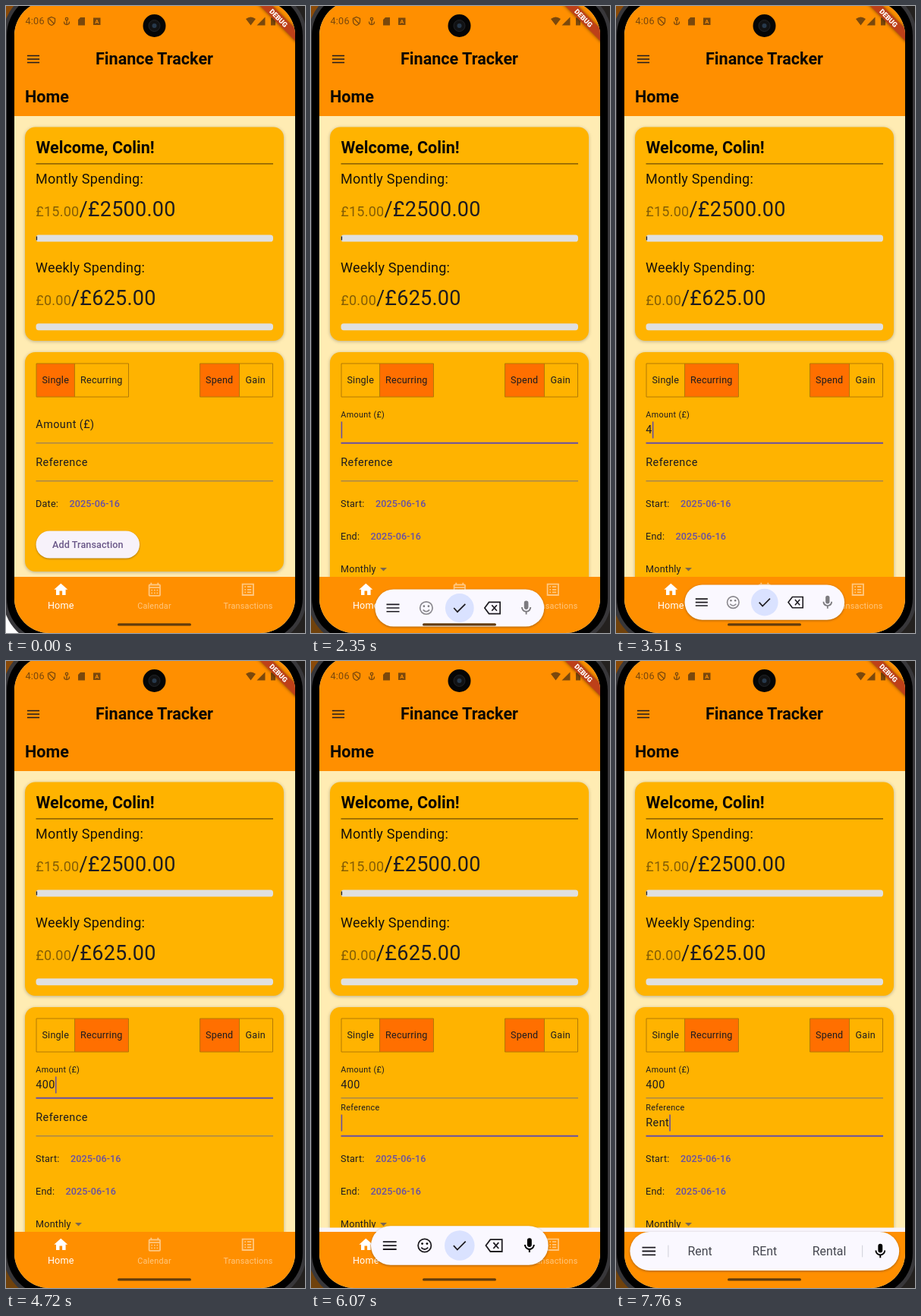
Write an HTML page that moves like this. It is 394x826 px and loops after 8 s.

```html
<!DOCTYPE html>
<html lang="en">
<head>
<meta charset="utf-8">
<title>Finance Tracker</title>
<style>
  html, body { margin: 0; width: 100%; height: 100%; overflow: hidden; background: #000; }
  svg { display: block; width: 100%; height: 100%; }
  text { font-family: Roboto, sans-serif; fill: #1d1b20; white-space: pre; }
  .title { font-size: 21.6px; font-weight: 700; fill: #0b0804; }
  .heading { font-size: 18px; letter-spacing: .225px; fill: #16110a; }
  .total { font-size: 27px; letter-spacing: .225px; }
  .spent { font-size: 18px; letter-spacing: .225px; fill: #855e05; }
  .body { font-size: 12.6px; letter-spacing: .225px; }
  .field { font-size: 14.4px; letter-spacing: .45px; }
  .action { font-size: 12.6px; font-weight: 500; letter-spacing: .09px; fill: #6750a4; }
  .tab { font-size: 10.8px; letter-spacing: .225px; fill: #fff; text-anchor: middle; }
  .hint { font-size: 16.2px; fill: #44464f; text-anchor: middle; }
  .card { fill: #ffb300; filter: drop-shadow(0 1.5px 2px #0004); }
  .outline { fill: none; stroke: #b37a05; }
  .line { stroke: #1d1b20; stroke-width: 1.8; fill: none; }
  .status { fill: #7a480c; }
</style>
</head>
<body>
<svg viewBox="0 0 394 826" preserveAspectRatio="none">
  <defs>
    <clipPath id="screenClip"><rect x="11" y="-7" width="370" height="833" rx="46"/></clipPath>
    <clipPath id="bodyClip"><rect x="11" y="145" width="370" height="607"/></clipPath>
    <path id="mic" d="M12 14a3 3 0 0 0 3-3V5a3 3 0 0 0-6 0v6a3 3 0 0 0 3 3zm5-3a5 5 0 0 1-10 0H5a7 7 0 0 0 6 6.9V21h2v-3.1A7 7 0 0 0 19 11z"/>
    <path id="menu" class="line" d="M-9-5H9M-9 0H9M-9 5H9"/>
  </defs>

  <rect width="394" height="826" fill="#24211f"/>
  <path d="M0 0H14L0 18z" fill="#8a4a08"/>
  <path id="corner" d="M0 798H22V826H0z"/>
  <rect x="-4" y="-22" width="400" height="863" rx="61" fill="#38373a"/>
  <rect x="1" y="-17" width="390" height="853" rx="56" fill="#000"/>

  <g clip-path="url(#screenClip)">
    <rect x="11" y="-7" width="370" height="833" fill="#ffecb3"/>

    <g clip-path="url(#bodyClip)">
      <rect class="card" x="25" y="159.5" width="341" height="281.5" rx="13.5"/>
      <text class="title" x="39.5" y="194">Welcome, Colin!</text>
      <path d="M39.5 207.8H352" stroke="#6b4b04" stroke-width="1.2"/>
      <text class="heading" x="39" y="234">Montly Spending:</text>
      <text class="spent" x="39.3" y="277">£15.00</text>
      <text class="total" x="96.5" y="277">/£2500.00</text>
      <rect x="39.5" y="301.5" width="312.5" height="9" rx="3.6" fill="#e0e0e0"/>
      <path d="M40.4 303.5v5" stroke="#222" stroke-width="1.4"/>
      <text class="heading" x="39" y="351">Weekly Spending:</text>
      <text class="spent" x="39.3" y="394">£0.00</text>
      <text class="total" x="86" y="394">/£625.00</text>
      <rect x="39.5" y="418.2" width="312.5" height="9" rx="3.6" fill="#e0e0e0"/>

      <rect id="formCard" class="card" x="25" y="456" width="341" height="289" rx="13.5"/>
      <rect id="singleFill" x="40" y="471" width="50.5" height="44" fill="#ff6f00"/>
      <rect id="recurFill" x="90.5" y="471" width="71" height="44" fill="#ff6f00"/>
      <path class="outline" d="M40 471H161.5V515H40zM90.5 471v44"/>
      <text class="body" x="47.4" y="497.3">Single</text>
      <text class="body" x="98" y="497.3">Recurring</text>
      <rect x="255.5" y="471" width="52" height="44" fill="#ff6f00"/>
      <path class="outline" d="M255.5 471H351.5V515H255.5zM307.5 471v44"/>
      <text class="body" x="263" y="497.3">Spend</text>
      <text class="body" x="315.5" y="497.3">Gain</text>

      <g id="amount"></g>
      <g id="reference"></g>

      <g id="singleForm">
        <text class="body" x="39" y="660">Date:</text>
        <text class="action" x="83.5" y="660">2025-06-16</text>
        <rect x="39.5" y="691.5" width="136.5" height="36" rx="18" fill="#f7f2fa" style="filter:drop-shadow(0 1px 1px #0005)"/>
        <text class="action" x="61" y="714" style="fill:#6a5788">Add Transaction</text>
      </g>
      <g id="recurForm">
        <text class="body" x="39" y="660">Start:</text>
        <text class="action" x="85" y="660">2025-06-16</text>
        <text class="body" x="39" y="703">End:</text>
        <text class="action" x="78.5" y="703">2025-06-16</text>
        <text class="body" x="39" y="746">Monthly</text>
        <path d="M91 740h9l-4.500 4.500z" fill="#7a6650"/>
      </g>
      <rect id="strip" x="11" y="746.5" width="370" height="6" fill="#f8f4fb"/>
    </g>

    <rect x="11" y="-7" width="370" height="152" fill="#ff8f00"/>
    <g transform="translate(36 70) scale(.9)"><use href="#menu"/></g>
    <text class="title" x="118" y="77">Finance Tracker</text>
    <text class="title" x="25" y="127">Home</text>

    <text class="body" x="25.5" y="24" style="fill:#7a480c">4:06</text>
    <g fill="none" stroke="#7a480c" stroke-width="1.3">
      <path d="M60 14.5l4.500 2v3.500q0 4-4.500 5.500-4.500-1.500-4.500-5.500v-3.500zM57 17l6 6"/>
      <circle cx="80" cy="17" r="1.7"/>
      <path d="M80 19v6M76.5 20.5q0 4 3.500 4t3.500-4"/>
    </g>
    <path class="status" d="M98 15h6v10.500h-9V18zM115 15.500h9.500v9.500H115zM316 17q6.500-5 13 0l-6.500 8.500zM341.500 14.500v11h-11zM349 15.500h1.500V14h3v1.500h1.500v10h-6z"/>
    <text x="119.7" y="23" text-anchor="middle" style="font-size:7.5px;font-weight:700;fill:#ff8f00">A</text>

    <rect x="11" y="752" width="370" height="74" fill="#ff8f00"/>
    <path transform="translate(61.5 758) scale(.9)" fill="#fff" d="M10 20v-6h4v6h5v-8h3L12 3 2 12h3v8z"/>
    <text class="tab" x="72.3" y="793.5" style="font-size:12.6px">Home</text>
    <g opacity=".5" fill="#fff" fill-rule="evenodd">
      <path transform="translate(185 758) scale(.9)" d="M19 4h-1V2h-2v2H8V2H6v2H5a2 2 0 0 0-2 2v14a2 2 0 0 0 2 2h14a2 2 0 0 0 2-2V6a2 2 0 0 0-2-2zm0 16H5V10h14zm0-12H5V6h14zM7 12h2v2H7zm4 0h2v2h-2zm4 0h2v2h-2zm-8 4h2v2H7zm4 0h2v2h-2zm4 0h2v2h-2z"/>
      <path transform="translate(308 758) scale(.9)" d="M3 3h18v18H3zM5 5v14h14V5zM7 7h2v2H7zm4 0h6v2h-6zm-4 4h2v2H7zm4 0h6v2h-6zm-4 4h2v2H7zm4 0h6v2h-6z"/>
      <text class="tab" x="195.5" y="793.5">Calendar</text>
      <text class="tab" x="319" y="793.5">Transactions</text>
    </g>

    <g id="toolbar">
      <rect id="pill" y="-26" height="52" rx="26" fill="#faf8ff" style="filter:drop-shadow(0 1px 1.5px #0005)"/>
      <use id="menuKey" href="#menu"/>
      <g id="keys">
        <g id="smiley" transform="translate(-46.5 0)">
          <circle class="line" r="8.7"/>
          <path class="line" d="M-4.500 2.500q4.500 5 9 0"/>
          <circle cx="-3.2" cy="-2.5" r="1.4"/><circle cx="3.2" cy="-2.5" r="1.4"/>
        </g>
        <circle r="20" fill="#dae2ff"/>
        <path class="line" d="M-8 0l5 5.500L8-5.500"/>
        <path class="line" transform="translate(46 0)" d="M-5-8H10.500V8H-5L-11 0zM-1-4l7 8M6-4l-7 8"/>
      </g>
      <g id="hints">
        <path d="M-129.500-8V8M131.500-8V8" stroke="#cfcfd8"/>
        <text class="hint" x="-87" y="6"></text>
        <text class="hint" x="0" y="6"></text>
        <text class="hint" x="87" y="6"></text>
      </g>
      <use id="micKey" href="#mic"/>
    </g>

    <rect x="147" y="813.2" width="97" height="3.4" rx="1.7" fill="#633c0c"/>
    <g transform="translate(381 -6) rotate(45)">
      <rect x="-45" y="25.2" width="90" height="11.5" fill="#bd4019" style="filter:drop-shadow(0 0 2px #0008)"/>
      <text x="0" y="34.2" text-anchor="middle" style="font-size:9.2px;font-weight:900;fill:#fff">DEBUG</text>
    </g>
    <circle cx="195.5" cy="26" r="15" fill="#050505"/>
    <circle cx="195.5" cy="26" r="7.5" fill="#111214" stroke="#222427"/>
    <circle cx="195.5" cy="26" r="3" fill="#27394c"/>
  </g>
</svg>

<script>
const LOOP = 8000, BLINK = 480;
const el = id => document.getElementById(id);
const set = (node, attrs) => { for (const k in attrs) node.setAttribute(k, attrs[k]); };
const show = (node, on) => { node.style.display = on ? '' : 'none'; };
const lerp = (a, b, p) => a + (b - a) * p;
const ramp = (t, start, length) => Math.min(1, Math.max(0, (t - start) / length));
const easeOut = p => 1 - (1 - p) ** 3;
const latest = (t, events) => events.filter(e => e[0] <= t).pop();

// Value along [time, value] points, eased out of each point.
function track(t, points) {
  let [time, value] = points[0];
  for (const [nextTime, nextValue] of points.slice(1)) {
    if (t < nextTime) return lerp(value, nextValue, easeOut(ramp(t, time, nextTime - time)));
    [time, value] = [nextTime, nextValue];
  }
  return value;
}

function makeField(id, label, baseline, focus, blur, keys) {
  const group = el(id);
  group.innerHTML = `<text class="field">${label}</text>
    <text class="field" x="39.3" y="${baseline + 7}"></text>
    <path d="M39.5 ${baseline + 19.8}H352"/>
    <rect y="${baseline - 8.5}" width="1.6" height="22" fill="#6750a4"/>`;
  const [labelText, input, rule, caret] = group.children;
  const edits = [[focus, ''], ...keys];
  return t => {
    const lift = easeOut(ramp(t, focus, 170));
    const focused = t >= focus && t < blur;
    const [editTime, value] = latest(t, edits) || [0, ''];
    set(labelText, { transform: `translate(39.3 ${lerp(baseline, baseline - 13.8, lift)}) scale(${lerp(1, .75, lift)})` });
    if (input.textContent !== value) input.textContent = value;
    const weight = ramp(t, focus, 140) - ramp(t, blur, 140);
    set(rule, { stroke: weight > .4 ? '#6750a4' : '#7d7174', 'stroke-width': lerp(1, 1.9, weight) });
    const width = value ? input.getComputedTextLength() : .3;
    set(caret, { x: 39.3 + width });
    show(caret, focused && Math.floor((t - editTime) / BLINK) % 2 === 0);
  };
}

const drawAmount = makeField('amount', 'Amount (£)', 556, 2210, 5050,
  [[3370, '4'], [3570, '40'], [3760, '400']]);
const drawReference = makeField('reference', 'Reference', 606, 5720, LOOP,
  [[6610, 'R'], [7220, 'Re'], [7690, 'Ren'], [7760, 'Rent']]);
const hintSets = [
  [6610, ['R', 'Re', 'Right']], [7220, ['Re', 'Red', 'Rest']],
  [7690, ['Ren', 'Rent', 'Rental']], [7760, ['Rent', 'REnt', 'Rental']]
];
const hintTexts = [...el('hints').querySelectorAll('text')];

function drawToolbar(t) {
  const first = t < 5000;
  show(el('toolbar'), (t >= 2240 && t < 3780) || t >= 5750);
  const y = first
    ? track(t, [[2240, 850], [2560, 771], [2840, 777], [3370, 777], [3510, 785.5], [3780, 794]])
    : track(t, [[5750, 850], [6070, 770], [6410, 777.5]]);
  const scale = first
    ? track(t, [[2240, .8], [2560, 1], [2840, .98], [3370, .98], [3510, .894], [3780, .75]])
    : track(t, [[5750, .8], [6070, .99], [6410, .98]]);
  const wide = easeOut(ramp(t, 6610, 420));
  const half = lerp(118, 181, wide), side = lerp(93, 155.6, wide);
  set(el('toolbar'), {
    transform: `translate(195.8 ${y}) scale(${scale})`,
    opacity: first ? 1 - ramp(t, 3540, 220) : 1
  });
  set(el('pill'), { x: -half, width: half * 2 });
  set(el('menuKey'), { x: -side });
  set(el('micKey'), { x: side - 12, y: -12, opacity: first ? .5 : 1 });
  set(el('smiley'), { opacity: first ? .5 : 1 });
  set(el('keys'), { opacity: 1 - ramp(t, 6610, 200) });
  set(el('hints'), { opacity: ramp(t, 6820, 200) });
  const hints = latest(t, hintSets);
  hintTexts.forEach((node, i) => { node.textContent = hints ? hints[1][i] : ''; });
}

function draw(t) {
  const recurring = t >= 1140, swap = ramp(t, 1140, 200);
  set(el('corner'), { fill: t < 730 ? '#fff' : '#70420c' });
  set(el('singleFill'), { opacity: 1 - swap });
  set(el('recurFill'), { opacity: Math.max(swap, .2 * ramp(t, 1070, 70)) });
  set(el('formCard'), { height: recurring ? 380 : 289 });
  show(el('singleForm'), !recurring);
  show(el('recurForm'), recurring);
  show(el('strip'), (t >= 2630 && t < 3440) || t >= 6000);
  drawAmount(t);
  drawReference(t);
  drawToolbar(t);
}

const start = performance.now();
function tick() {
  draw((performance.now() - start) % LOOP);
  requestAnimationFrame(tick);
}
tick();
</script>
</body>
</html>
```
